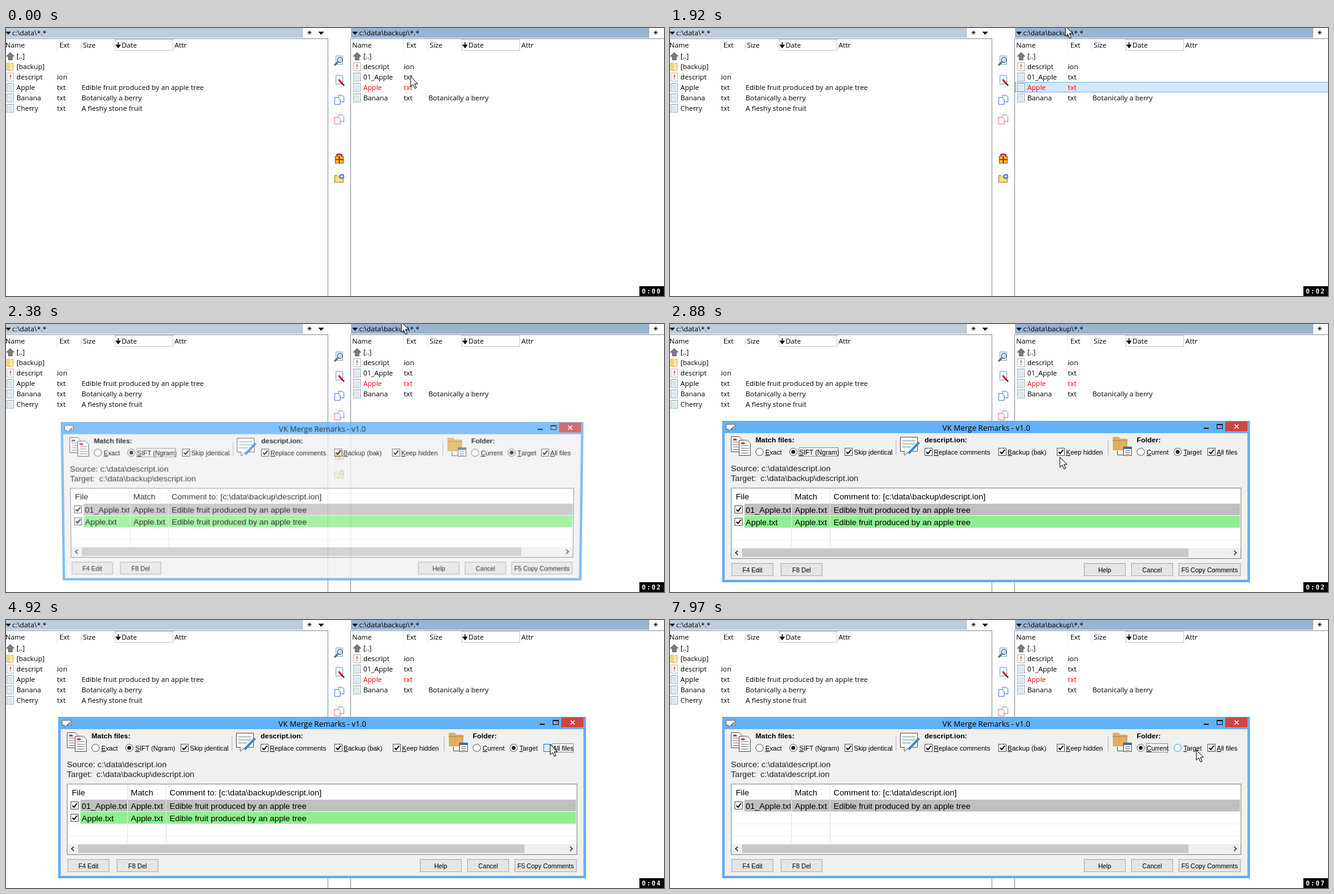
These frames come from a looping animation (1070 px wide and 437 px high, 8000 ms). An HTML page:

```html
<!DOCTYPE html>
<html lang="en">
<head>
<meta charset="utf-8">
<title>File panels</title>
<style>
html, body { margin: 0; width: 100%; height: 100%; overflow: hidden; background: #fff; }
svg { position: absolute; left: 0; top: 0; }
#dialog { transform-origin: 514px 289px; }
rect { shape-rendering: crispEdges; }
text { white-space: pre; }
.ui { font: 11.3px "Open Sans", "Noto Sans", sans-serif; }
.title { font: 12.4px "Open Sans", "Noto Sans", sans-serif; text-anchor: middle; }
.label { font: 10.7px "Liberation Sans", Arial, sans-serif; }
.bold { font: bold 11.5px "Liberation Sans", Arial, sans-serif; }
.list { font: 13.4px "Liberation Sans", Arial, sans-serif; }
.button { font: 10.3px "Liberation Sans", Arial, sans-serif; text-anchor: middle; }
.clock { font: bold 10px "DejaVu Sans Mono", monospace; letter-spacing: 2px; }
.u { text-decoration: underline; }
</style>
</head>
<body>
<svg id="panels" width="1070" height="437"></svg>
<svg id="dialog" width="1070" height="437"></svg>
<svg id="top" width="1070" height="437">
  <g id="cursor"><path d="M0 0V16.5L3.8 13L6.8 19.6L9.4 18.5L6.5 12H11.6Z" fill="#fff" stroke="#000"/></g>
  <rect x="1030" y="421" width="40" height="16"/>
  <text id="clock" class="clock" x="1034" y="432.5" fill="#fff"></text>
</svg>
<script>
const $ = id => document.getElementById(id);
const text = (x, y, s, cls = 'ui', fill = '#000') =>
  `<text x="${x}" y="${y}" class="${cls}" fill="${fill}">${s}</text>`;
const box = (x, y, w, h, fill, stroke) => stroke
  ? `<rect x="${x + .5}" y="${y + .5}" width="${w - 1}" height="${h - 1}" fill="${fill}" stroke="${stroke}"/>`
  : `<rect x="${x}" y="${y}" width="${w}" height="${h}" fill="${fill}"/>`;
const path = (d, stroke, fill = 'none', width = 1) =>
  `<path d="${d}" stroke="${stroke}" fill="${fill}" stroke-width="${width}"/>`;
const at = (x, y, s) => `<g transform="translate(${x} ${y})">${s}</g>`;

// File panels
const edge = '#8c919a';
const icons = {
  up: path('M7 -6L13 0H10V6H4V0H1Z', '#444', '#808080'),
  folder: path('M1 -6H6V6H1Z', '#dcb956', '#f5de88') + path('M5 -4L12 -6V5L5 7Z', '#d8b860', '#fbe9a0'),
  info: box(1, -7, 12, 14, '#fff', '#b4bcc3') + path('M7 -3.5V.5M7 2V3.5', '#e02020', 'none', 1.5),
  file: box(1, -7, 12, 14, '#f7fafc', '#a3afb8') +
    path('M3 -3.5H11M3 -1.5H11M3 .5H11M3 2.5H11M3 4.5H11', '#c3d5e0') +
    path('M2 -6.5H12', '#8d9aa3')
};
const star = x => path(`M${x} 4V11M${x - 3.5} 7.5H${x + 3.5}M${x - 2.5} 5L${x + 2.5} 10M${x + 2.5} 5L${x - 2.5} 10`, '#000', 'none', .8);
const arrowDown = x => path(`M${x - 4.5} 6H${x + 4.5}L${x} 11Z`, 'none', '#000');

function panel(x, dir, color, rows) {
  const bar = x ? [x - 3, 485] : [0, 483];
  let s = box(bar[0], 0, bar[1], 16, color) + box(bar[0], 17, x ? 509 : 524, 1, edge) +
    arrowDown(x + 3.5) + text(x + 10, 12, dir);
  for (const c of [82, 122]) s += box(x + c, 18, 1, 19, '#e6e6e6');
  s += box(x + 177, 18, 95, 19, '#fdfdfd', '#c8c8c8') +
    path(`M${x + 182.5} 23V31M${x + 179.5} 28L${x + 182.5} 32L${x + 185.5} 28Z`, '#000', '#000', 1.4);
  [[-1, 'Name'], [87, 'Ext'], [125, 'Size'], [188, 'Date'], [274, 'Attr']]
    .forEach(([dx, h]) => s += text(x + dx, 32, h));
  rows.forEach(([icon, name, ext = '', note = '', fill], i) => {
    const y = 46 + 17 * i;
    s += at(x, y, icons[icon]) + text(x + 17, y + 4, name, 'ui', fill) +
      text(x + 83, y + 4, ext, 'ui', fill) + text(x + 123, y + 4, note);
  });
  return s;
}

const sheet = (x, y, c, dash = '') =>
  `<path d="M${x} ${y}H${x + 6}L${x + 9} ${y + 3}V${y + 11}H${x}Z" fill="#f6f9ff" stroke="${c}" ${dash && 'stroke-dasharray="2 1"'}/>`;
const tools =
  box(523, 17, 1, 420, edge) + box(560, 17, 1, 420, edge) +
  box(536, 45, 12, 15, '#f7fbff', '#8aa6c8') + path('M540 55L534 61', '#7a6040', 'none', 2.5) +
  '<circle cx="543" cy="52" r="4" fill="#cfe6fa" stroke="#56718f" stroke-width="1.5"/>' +
  box(536, 77, 12, 15, '#f7fbff', '#7d9cd0') + path('M541 84L547 91', '#e01818', 'none', 3) + path('M547 91L550 94', '#222', 'none', 2) +
  sheet(540.5, 109.5, '#4d7fd0') + sheet(534.5, 113.5, '#4d7fd0') +
  sheet(540.5, 141.5, '#7d9ad6') + sheet(534.5, 145.5, '#e84050', 1) +
  box(535, 209, 14, 12, '#f4c430', '#8a5a10') + path('M542 209V221M535 214.5H549', '#a03018', 'none', 2) +
  path('M537 208Q542 204 547 208', '#d02030', 'none', 3) +
  path('M534.5 240.5H539L541 242.5H548.5V251.5H534.5Z', '#a98224', '#f8dc78') +
  '<circle cx="546" cy="242" r="4" fill="#3f78c8"/>' + path('M546 239.5V244.5M543.5 242H548.5', '#fff', 'none', 1.3);

const berry = ['file', 'Banana', 'txt', 'Botanically a berry'];
$('panels').innerHTML =
  panel(0, 'c:\\data\\*.*', '#bfcddb', [
    ['up', '[..]'], ['folder', '[backup]'], ['info', 'descript', 'ion'],
    ['file', 'Apple', 'txt', 'Edible fruit produced by an apple tree'],
    berry, ['file', 'Cherry', 'txt', 'A fleshy stone fruit']]) +
  star(493.5) + arrowDown(512.5) + tools +
  `<g id="selected">${box(561, 88, 511, 17, '#d3e8fc', '#7fb1de')}</g>` +
  panel(564, 'c:\\data\\backup\\*.*', '#99b4d1', [
    ['up', '[..]'], ['info', 'descript', 'ion'], ['file', '01_Apple', 'txt'],
    ['file', 'Apple', 'txt', '', '#ff0000'], berry]) +
  star(1056.5);

// Dialog
const label = (x, s, key, focusWidth) =>
  text(x, 213, s.slice(0, key) + `<tspan class="u">${s[key]}</tspan>` + s.slice(key + 1), 'label') +
  (focusWidth ? `<rect x="${x - .5}" y="201.5" width="${focusWidth}" height="14" fill="none" stroke="#333" stroke-dasharray="1 1"/>` : '');
const tone = mode => mode == 2 ? ['#d9ecff', '#2080d0'] : mode ? ['#f3f9ff', '#3399e6'] : ['#fff', '#555'];
function radio(x, s, on, focus, mode) {
  const [fill, stroke] = tone(mode);
  return `<circle cx="${x}" cy="208.5" r="6" fill="${fill}" stroke="${stroke}"/>` +
    (on ? `<circle cx="${x}" cy="208.5" r="3.2" fill="#222"/>` : '') + label(x + 9.5, s, 0, focus);
}
const tick = (x, y, on, mode) => box(x, y, 13, 13, ...tone(mode)) +
  (on ? path(`M${x + 3} ${y + 6.5}L${x + 5.5} ${y + 9.3}L${x + 10.5} ${y + 3}`, '#111', 'none', 2) : '');
const check = (x, s, key, on = true, focus = 0, mode = 0) =>
  tick(x, 202, on, mode) + label(x + 15, s, key, focus);
const button = (x, w, s) => box(x, 390, w, 21, '#e5e5e5', '#acacac') + text(x + w / 2, 405, s, 'button');
const docIcon = (x, y) => path(`M${x} ${y}H${x + 13}L${x + 18} ${y + 5}V${y + 25}H${x}Z`, '#555', '#fff') +
  path(`M${x + 3} ${y + 9}H${x + 15}M${x + 3} ${y + 13}H${x + 15}M${x + 3} ${y + 17}H${x + 15}M${x + 3} ${y + 21}H${x + 15}`, '#777') +
  path(`M${x + 3} ${y + 5}H${x + 9}`, '#c83a30', 'none', 3);

const frame =
  box(85, 158, 858, 263, '#62b2fa', '#57a0e2') + box(89, 178, 850, 239, '#f0f0f0') +
  path('M91.5 163.5H105.5V171.5H99L95 175V171.5H91.5Z', '#666', '#fff') + path('M99 173L104 167', '#3f86c8', 'none', 2) +
  text(514.5, 174, 'VK Merge Remarks - v1.0', 'title') +
  box(868, 169, 8, 2, '#111') + box(889, 163, 10, 8, 'none', '#111') + box(889, 163, 10, 2, '#111') +
  box(903, 159, 36, 16, '#d04448') + path('M918 164L924.5 170.5M924.5 164L918 170.5', '#fff', 'none', 1.7) +
  docIcon(99.5, 183.5) + docIcon(112.5, 189.5) +
  path('M374.5 184.5H402.5V207.5H389L381 214V207.5H374.5Z', '#555', '#fff') +
  path('M378 190.5H399M378 195.5H399M378 200.5H392', '#8aa', 'none', 1.5) + path('M388 211L405 193', '#3c84c8', 'none', 4) +
  path('M720 184H730L732 187H744V206H720Z', 'none', '#dfae60') + box(720, 189, 24, 2, '#c99645') +
  path('M727.5 207V213.5H737', '#555') + box(737, 200, 14, 15, '#fff', '#555') + box(738, 201, 12, 3, '#3c78b8') +
  path('M740 206.5H748M740 209.5H748M740 212.5H748', '#777') +
  box(367, 190, 1, 24, '#b8b8b8') + box(712, 190, 1, 24, '#b8b8b8') +
  text(139, 193, 'Match files:', 'bold') + text(414, 193, 'descript.ion:', 'bold') + text(759, 193, 'Folder:', 'bold') +
  radio(145.5, 'Exact', false) + check(284, 'Skip identical', 5) +
  check(414, 'Replace comments', 0) + check(534, 'Backup (bak)', 0) + check(629, 'Keep hidden', 0) +
  text(99, 240, 'Source: c:\\data\\descript.ion', 'list', '#222') + text(99, 256, 'Target:', 'list', '#222') +
  box(99, 267, 830, 116, '#fff', '#828790') +
  box(100, 365, 828, 17, '#f0f0f0') + box(117, 366, 726, 14, '#c8c8c8') +
  path('M110.5 369.5L106.5 373L110.5 376.5M917 369.5L921 373L917 376.5', '#333', 'none', 1.6) +
  text(107, 286, 'File', 'list') + text(203, 286, 'Match', 'list') +
  button(100, 68, 'F4 Edit') + button(180, 68, 'F8 Del') + button(673, 68, 'Help') +
  button(750, 68, 'Cancel') + button(827, 101, 'F5 Copy Comments');

$('dialog').innerHTML = '<clipPath id="cell"><rect x="100" y="268" width="96" height="98"/></clipPath>' +
  frame + '<g id="live"></g>';

function live({ focus, all, allMode, current, curMode, tgtMode, rows }) {
  const file = current ? 'c:\\data\\descript.ion' : 'c:\\data\\backup\\descript.ion';
  let s = radio(200.5, 'SIFT (Ngram)', true, focus == 'sift' && 64) +
    radio(765.5, 'Current', current, focus == 'current' && 35, curMode) +
    radio(825.5, 'Target', !current, 0, tgtMode) +
    check(874, 'All files', 0, all, focus == 'all' && 34, allMode) +
    text(147, 256, file, 'list', '#222') + text(266, 286, `Comment to: [${file}]`, 'list');
  for (const y of [312, 332, 352]) s += box(100, y, 827, 1, '#eee');
  rows.forEach((name, i) => s += box(121, 293 + 20 * i, 806, 19, i ? '#90ee90' : '#c0c0c0'));
  for (const x of [197, 260]) s += box(x, 268, 1, 97, '#e4e4e4');
  rows.forEach((name, i) => {
    const y = 308 + 20 * i;
    s += tick(105, 296 + 20 * i, true) +
      `<g clip-path="url(#cell)">${text(123, y, name, 'list')}</g>` +
      text(203, y, 'Apple.txt', 'list') + text(266, y, 'Edible fruit produced by an apple tree', 'list');
  });
  return s;
}

// Motion: [time, x, y]
const route = [
  [0, 658, 79], [90, 658, 78], [300, 650, -3], [930, 650, -3], [1110, 643, -3],
  [2650, 643, -3], [2850, 634, 217], [2980, 634, 217], [3470, 790, 222], [3780, 885, 203],
  [5200, 885, 203], [5620, 850, 200], [5680, 846, 202], [5940, 793, 210],
  [7560, 793, 210], [7800, 838, 216], [7970, 856, 212], [8001, 856, 212]];
const ticks = [1010, 1920, 2960, 3950, 4985, 5980, 7170];
const within = (t, a, b) => t >= a && t < b;

function cursorAt(t) {
  const i = route.findIndex(p => p[0] > t);
  const [t0, x0, y0] = route[i - 1], [t1, x1, y1] = route[i];
  const k = (t - t0) / (t1 - t0);
  return `translate(${Math.round(x0 + (x1 - x0) * k)} ${Math.round(y0 + (y1 - y0) * k)})`;
}

function stateAt(t) {
  const pair = ['01_Apple.txt', 'Apple.txt'];
  return {
    focus: t < 3850 ? 'sift' : t < 5960 ? 'all' : 'current',
    all: !within(t, 3880, 4980),
    allMode: within(t, 3850, 3930) || within(t, 4830, 4980) ? 2 : +within(t, 3750, 5350),
    current: t >= 6000,
    curMode: within(t, 5950, 6020) || within(t, 6570, 6660) || within(t, 7350, 7410) ? 2 : +within(t, 5900, 7650),
    tgtMode: +(within(t, 5700, 5800) || t >= 7750),
    rows: within(t, 3950, 4880) ? [pair[1]] : t < 6080 ? pair : [pair[0]]
  };
}

let shown = '';
function draw(now) {
  const t = now % 8000;
  $('cursor').setAttribute('transform', cursorAt(t));
  $('clock').textContent = '0:0' + ticks.filter(x => t >= x).length;
  $('selected').style.display = within(t, 760, 2160) ? '' : 'none';

  const rest = (1 - Math.min(1, Math.max(0, (t - 2240) / 310))) ** 2;
  const dialog = $('dialog').style;
  dialog.opacity = t < 2240 ? 0 : 1 - .67 * rest;
  dialog.transform = rest ? `perspective(3300px) rotateX(${-20 * rest}deg) scale(${1 - .044 * rest})` : 'none';

  const state = stateAt(t), key = JSON.stringify(state);
  if (key != shown) {
    shown = key;
    $('live').innerHTML = live(state);
  }
}

const start = performance.now();
function loop() {
  draw(performance.now() - start);
  requestAnimationFrame(loop);
}
loop();
</script>
</body>
</html>
```
